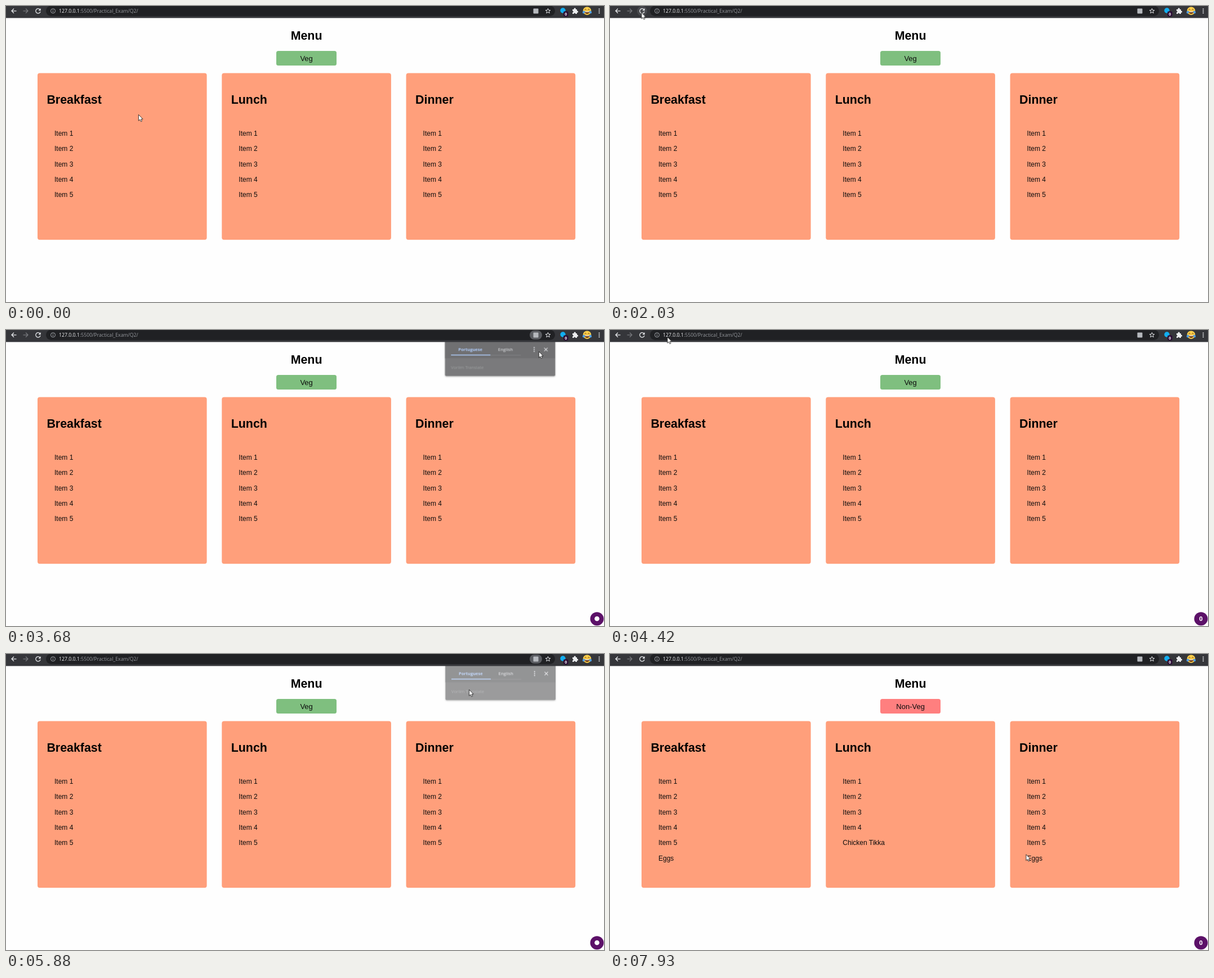
Write an HTML page that moves like this. It is 1062 px wide and 527 px high and loops after 7.99 s.

```html
<!DOCTYPE html>
<html lang="en">
<head>
<meta charset="utf-8">
<title>Menu</title>
<style>
html, body { margin: 0; width: 100%; height: 100%; overflow: hidden; background: #fefefe; }
svg { display: block; width: 1062px; height: 527px; }
.page { font-family: "Liberation Sans", Arial, sans-serif; font-size: 12px; fill: #0c0c0c; }
.head { font-size: 21.4px; font-weight: bold; fill: #000; }
.btn { font-size: 13px; text-anchor: middle; }
.ui { font-family: "Open Sans", "Noto Sans", sans-serif; font-size: 8.7px; }
.bold { font-weight: bold; }
.line { fill: none; stroke: #e8eaed; stroke-width: 1.3; }
.thin { stroke-width: 1; }
#popup { transform-origin: 876px 50px; filter: drop-shadow(0 1px 1.5px rgba(0,0,0,.5)); font-size: 7.7px; }
</style>
</head>
<body>
<svg viewBox="0 0 1062 527">
  <rect width="1062" height="527" fill="#fefefe"/>

  <g class="page">
    <text class="head" x="533.6" y="60" text-anchor="middle">Menu</text>
    <g id="veg">
      <rect x="480" y="80" width="107" height="26" rx="3.5" fill="#7fbf7f"/>
      <text class="btn" x="533.6" y="97.7">Veg</text>
    </g>
    <g id="nonveg">
      <rect x="480" y="80" width="107" height="26" rx="3.5" fill="#ff7f7f"/>
      <text class="btn" x="533.6" y="97.7">Non-Veg</text>
    </g>
    <g id="cards"></g>
    <g id="vegItems"></g>
    <g id="meatItems"></g>
  </g>

  <g id="bubble" class="ui bold">
    <circle cx="1049.5" cy="514.3" r="12" fill="#5c1168"/>
    <circle id="dot" cx="1049.5" cy="514" r="4.3" fill="#fff"/>
    <text id="zero" x="1049.5" y="518" font-size="11" fill="#fff" text-anchor="middle">0</text>
  </g>

  <g id="popup" class="ui">
    <rect x="778.5" y="19" width="195.5" height="62.5" rx="2" fill="#3a3b3d"/>
    <rect x="778.5" y="19" width="195.5" height="31" fill="#2b2c2f"/>
    <text class="bold" x="802" y="37.3" font-size="7.5" fill="#8ab4f8">Portuguese</text>
    <text x="872.6" y="37.3" font-weight="600" fill="#b4b6ba">English</text>
    <path d="M859 44.5H913" stroke="#45464a"/>
    <path d="M789 44.3H859" stroke="#8ab4f8" stroke-width="1.4"/>
    <g class="dots" transform="translate(936.7 34.3)" fill="#c4c7cb"></g>
    <path d="M954.5 31.3l6 6m0 -6l-6 6" stroke="#d0d2d6" stroke-width="1.2"/>
    <text x="789" y="68.8" fill="#707174">Vorlim Translate</text>
  </g>

  <g class="ui">
    <rect width="1062" height="21.4" fill="#35363a"/>
    <rect x="71" y="-.5" width="904" height="18.5" rx="9.2" fill="#202124"/>
    <path class="line" d="M18.5 8.8H10M14 4.8l-4 4l4 4"/>
    <path class="line" d="M30.5 8.8H39M35 4.8l4 4l-4 4" style="stroke:#77787c"/>
    <circle id="hover" cx="57" cy="9" r="9" fill="#48494d"/>
    <path class="line" d="M60.1 6A4.2 4.2 0 1 0 61.1 9.9"/>
    <path d="M61.7 4v4.2h-4.2z" fill="#e8eaed"/>
    <circle class="line thin" cx="83.5" cy="8.8" r="4" style="stroke:#a5a8ad"/>
    <path d="M83.5 8.3v2.6M83.5 6.4v1" stroke="#a5a8ad"/>
    <text x="94" y="12" fill="#f0f1f3">127.0.0.1</text>
    <text x="131" y="12" fill="#96999e">:5500/Practical_Exam/Q2/</text>

    <rect id="pill" x="930" y="1" width="22" height="16" rx="8" fill="#5a5c61"/>
    <rect x="936.5" y="4.5" width="9" height="9" rx="1" fill="#b5b8bd"/>
    <path id="star" class="line thin"/>
    <circle cx="989" cy="8" r="4.7" fill="#12aef0"/>
    <rect x="990" y="9.5" width="8.5" height="9" rx="2" fill="#2b0b35"/>
    <text class="bold" x="994.3" y="16.8" font-size="7" fill="#fff" text-anchor="middle">0</text>
    <path d="M1006 6h2.7a1.7 1.7 0 1 1 3 0h2.3v2.7a1.6 1.6 0 1 1 0 3V14h-2.6a1.5 1.5 0 0 0 -3 0H1006v-2.5a1.5 1.5 0 0 0 0 -3Z" fill="#eceef0"/>
    <circle cx="1032" cy="8.7" r="7.3" fill="#fcd04a"/>
    <path d="M1027.5 9.5h9a4.5 4.5 0 0 1 -9 0Z" fill="#6d3a16"/>
    <path d="M1028.3 9.7h7.4v1.3h-7.4z" fill="#fff"/>
    <path d="M1027.5 6.8q1.7 -2.5 3.3 0M1033.2 6.8q1.7 -2.5 3.3 0" fill="none" stroke="#6d3a16"/>
    <ellipse cx="1026" cy="11" rx="2" ry="2.5" fill="#4f9fe6" transform="rotate(35 1026 11)"/>
    <ellipse cx="1038" cy="11" rx="2" ry="2.5" fill="#4f9fe6" transform="rotate(-35 1038 11)"/>
    <g class="dots" transform="translate(1053.5 8.9)" fill="#e8eaed"></g>
  </g>

  <path id="cursor" d="M.4 .4V11.3L2.9 9L4.6 12.7L6.5 11.9L4.9 8.3H8.1Z" fill="#fff" stroke="#111" stroke-width=".8"/>
</svg>

<script>
const LOOP = 7990;
const $ = id => document.getElementById(id);
const text = (x, y, s, cls = '') => `<text class="${cls}" x="${x}" y="${y}">${s}</text>`;

// Static parts
const colX = col => 56 + 327.3 * col;
const item = (col, row, s) => text(colX(col) + 30, 231 + 27.33 * row, s);

$('cards').innerHTML = ['Breakfast', 'Lunch', 'Dinner'].map((name, col) => {
  const x = colX(col);
  let out = `<rect x="${x}" y="119.5" width="300.6" height="296.8" rx="4" fill="#ff9f7b"/>`
    + text(x + 16.4, 173.7, name, 'head');
  for (let row = 0; row < 4; row++) out += item(col, row, 'Item ' + (row + 1));
  return out + (name === 'Lunch' ? '' : item(col, 4, 'Item 5'));
}).join('');
$('vegItems').innerHTML = item(1, 4, 'Item 5');
$('meatItems').innerHTML = item(0, 5, 'Eggs') + item(1, 4, 'Chicken Tikka') + item(2, 5, 'Eggs');

document.querySelectorAll('.dots').forEach(g => {
  g.innerHTML = [-3.4, 0, 3.4].map(y => `<circle cy="${y}" r="1.1"/>`).join('');
});
$('star').setAttribute('d', 'M' + Array.from({ length: 10 }, (_, i) => {
  const r = i % 2 ? 2 : 4.6, a = Math.PI * (i / 5 - 0.5);
  return (962.5 + r * Math.cos(a)).toFixed(2) + ' ' + (9 + r * Math.sin(a)).toFixed(2);
}).join('L') + 'Z');

// Every track runs over the same loop and holds its ends
function play(id, frames) {
  const keys = frames.map(({ t, ...style }) => ({ offset: t / LOOP, ...style }));
  const first = { ...keys[0], offset: 0 }, last = { ...keys[keys.length - 1], offset: 1 };
  $(id).animate([first, ...keys, last], { duration: LOOP, iterations: Infinity });
}

// Hidden or shown at first, then flipped at each time
function toggle(id, shown, times) {
  play(id, [0, ...times].map((t, i) => ({
    t, opacity: +((i % 2 === 0) === shown), easing: 'steps(1, end)'
  })));
}

// Each visit reloads the page, which opens the popup; then the popup is closed
const visits = [{ reload: 2081, close: 3600 }, { reload: 4881, close: 5758 }];
const OPEN = 160, SHUT = 250, COUNT = 1929, SWITCH = 6270;
const spans = rule => visits.flatMap(rule);
const counted = spans(v => [v.reload, v.reload + COUNT]);

['veg', 'vegItems'].forEach(id => toggle(id, true, [SWITCH]));
['nonveg', 'meatItems'].forEach(id => toggle(id, false, [SWITCH]));
toggle('bubble', false, [visits[0].reload]);
toggle('dot', false, counted);
toggle('zero', true, counted);
toggle('hover', false, spans(v => [v.reload - 55, v.reload + 300]));
toggle('pill', false, spans(v => [v.reload, v.close + 2 * SHUT]));

const pose = (t, opacity, shift, scale) =>
  ({ t, opacity, transform: `translate(${shift}px, ${shift / 4}px) scale(${scale})` });
play('popup', spans(v => [
  pose(v.reload, 0, 0, 0.955), pose(v.reload + OPEN, 1, 0, 1),
  pose(v.close, 1, 0, 1), pose(v.close + SHUT, 0, 4, 1)
]));

// Pointer trips: leave, arrive, and the place reached
let spot = [235, 193];
const trip = (leave, arrive, ...to) => {
  const from = spot;
  spot = to;
  return [[leave, from], [arrive, to]].map(([t, [x, y]]) =>
    ({ t, transform: `translate(${x}px, ${y}px)` }));
};
play('cursor', [
  trip(30, 570, 153, 105),
  trip(830, 1100, 126.7, 47),
  trip(1100, 1800, 55.5, 11.3),
  trip(2430, 3150, 1042, 24),
  trip(3150, 3680, 948, 38),
  trip(3680, 4070, 139, 12),
  trip(4070, 4800, 61, 12),
  trip(4990, 5758, 950, 37),
  trip(5758, 5880, 823, 63),
  trip(5880, 6200, 533, 93),
  trip(7200, 7600, 278, 386),
  trip(7600, 7925, 738.5, 356.5)
].flat());
</script>
</body>
</html>
```
